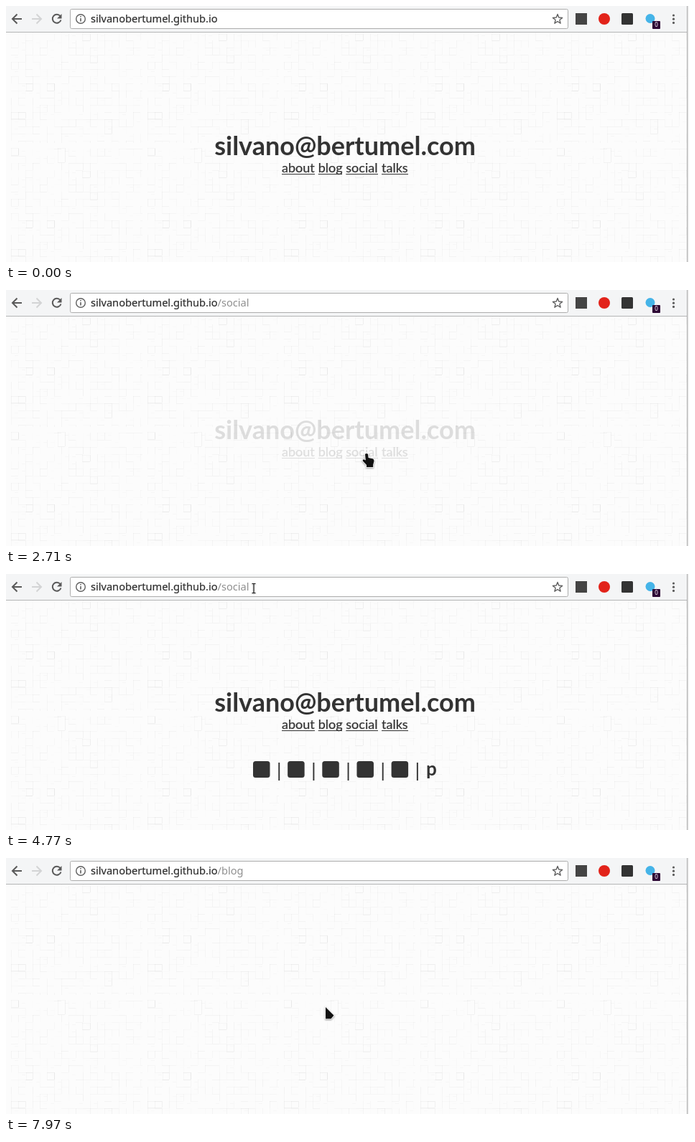
Recreate the animation shown at these times as an HTML page with a canvas. Size 951 by 357 pixels, loop 8000 ms.

```html
<!DOCTYPE html>
<html lang="en">
<head>
<meta charset="utf-8">
<title>Personal page</title>
<style>
  html, body { margin: 0; width: 951px; height: 357px; overflow: hidden; background: #fcfcfc; }
  canvas, svg { position: absolute; left: 0; top: 0; display: block; }
  .lato { font-family: Lato, sans-serif; fill: #333; }
  .title { font-size: 36px; font-weight: 700; text-anchor: middle; }
  .link { font-size: 18px; font-weight: 400; stroke: #333; stroke-width: .25px; }
  .url { font: 14.6px "Noto Sans", "Open Sans", sans-serif; fill: #2e2e2e; stroke: #2e2e2e; stroke-width: .2px; white-space: pre; }
  .url tspan { fill: #8f8f8f; stroke: none; }
</style>
</head>
<body>
<canvas id="paper" width="951" height="357"></canvas>
<svg width="951" height="357" viewBox="0 0 951 357">
  <g id="page">
    <g id="head">
      <text class="lato title" x="472" y="208">silvano@bertumel.com</text>
      <g id="links"></g>
    </g>
    <g id="social" fill="#333"></g>
  </g>

  <rect width="948" height="36" fill="#f4f5f6"/>
  <rect y="36" width="948" height="1" fill="#b4b5b6"/>
  <rect x="949" width="2" height="357" fill="#eeeeee"/>
  <rect x="948" width="1" height="357" fill="#aaaaaa"/>

  <g fill="none" stroke="#5a5a5a" stroke-width="2">
    <path d="M22 18H9.5M15.5 11.5L9 18l6.5 6.5"/>
    <path stroke="#d3d4d5" d="M36 18h12.5M42.5 11.5L49 18l-6.5 6.5"/>
    <path d="M75.5 14a6 6 0 1 0 1 5.5"/>
  </g>
  <path d="M77.5 11v6.5H71z" fill="#5a5a5a"/>

  <rect x="89.5" y="4.5" width="693" height="27" rx="2" fill="#fff" stroke="#adadad"/>
  <circle cx="104" cy="18" r="6.3" fill="none" stroke="#5f5f5f" stroke-width="1.4"/>
  <path d="M104 17v4.5M104 14v1.6" stroke="#5f5f5f" stroke-width="1.6"/>
  <text class="url" x="118" y="23">silvanobertumel.github.io<tspan id="path"></tspan></text>
  <path id="star" fill="none" stroke="#5f5f5f" stroke-width="1.4" stroke-linejoin="round"/>

  <rect x="793" y="10" width="16" height="16" fill="#444"/>
  <circle cx="833" cy="18" r="8" fill="#e2231a"/>
  <rect x="857" y="10" width="16" height="16" rx="1.5" fill="#333"/>
  <circle cx="897" cy="17.5" r="6.5" fill="#45b4e8"/>
  <rect x="900" y="21" width="11" height="11" rx="1" fill="#2d0735"/>
  <text x="905.5" y="29.3" text-anchor="middle" fill="#fff" style="font:8px 'Noto Sans',sans-serif">0</text>
  <g fill="#5a5a5a">
    <circle cx="929.5" cy="13" r="1.6"/><circle cx="929.5" cy="18.2" r="1.6"/><circle cx="929.5" cy="23.4" r="1.6"/>
  </g>

  <g id="cursor" style="filter:drop-shadow(.5px 1px 1px rgba(0,0,0,.4))">
    <path id="arrow" d="M0 0L11.5 11.5L7.5 16.3H0z" fill="#111" stroke="#fff" stroke-width="1.6" paint-order="stroke"/>
    <path id="hand" d="M-2 1Q0-1 2 1L2.6 6L8.5 7.2Q10.8 8 10.4 11L9.2 15.5V19H0V16L-5.2 10.6Q-6 7.6-3 8.4L-1.2 9.6z"
      fill="#111" stroke="#fff" stroke-width="1.6" paint-order="stroke"/>
    <path id="beam" d="M-2.5-6.5h1.8L0-6L.7-6.5H2.5M0-6V6M-2.5 6.5h1.8L0 6L.7 6.5H2.5" fill="none" stroke="#111" stroke-width="1.1"/>
  </g>
</svg>
<script>
const LOOP = 8000;
const $ = id => document.getElementById(id);
const NS = 'http://www.w3.org/2000/svg';

function add(parent, tag, attrs, text = '') {
  const el = document.createElementNS(NS, tag);
  for (const k in attrs) el.setAttribute(k, attrs[k]);
  el.textContent = text;
  parent.append(el);
}

// Paper texture: faint seeded strokes on a 10px grid, repeated as a tile.
function drawPaper() {
  const w = 190, h = 191;
  const tile = document.createElement('canvas');
  tile.width = w; tile.height = h;
  const c = tile.getContext('2d');
  let seed = 41;
  const rnd = () => (seed = seed * 16807 % 2147483647) / 2147483647;
  const ink = a => c.fillStyle = `rgba(60,60,60,${a})`;
  c.fillStyle = '#fcfcfc';
  c.fillRect(0, 0, w, h);
  for (let y = 8; y < h; y += 10) for (let x = 7; x < w; x += 10) {
    ink(rnd() * .045);
    if (rnd() < .6) c.fillRect(x, y, 10, 1);
    ink(rnd() * .045);
    if (rnd() < .6) c.fillRect(x, y, 1, 10);
    ink(rnd() * .03);
    if (rnd() < .3) c.fillRect(x + 5, y + 3, 5, 1);
  }
  const boxes = [[28,108,9,10],[57,108,10,10],[7,148,20,9],[106,39,11,9],[117,69,10,10],[7,7,10,10],[72,7,10,20],[137,158,10,20]];
  for (const [x, y, bw, bh] of boxes) {
    ink(.055);
    c.fillRect(x, y + bh, bw, 1);
    c.fillRect(x + bw, y, 1, bh);
    ink(.03);
    c.fillRect(x, y, 1, bh);
    c.fillRect(x, y, bw, 1);
  }
  const p = $('paper').getContext('2d');
  p.fillStyle = p.createPattern(tile, 'repeat');
  p.fillRect(0, 0, 951, 357);
}

const words = [['about', 384, 430], ['blog', 434.7, 468], ['social', 473.3, 518], ['talks', 523, 560]];

function build() {
  for (const [word, x, end] of words) {
    add($('links'), 'text', { class: 'lato link', x, y: 232 }, word);
    add($('links'), 'rect', { x, y: 234, width: end - x, height: 1, fill: '#333' });
  }
  for (let i = 0; i < 5; i++) {
    const x = 344 + 48.15 * i;
    add($('social'), 'rect', { x, y: 261, width: 23.5, height: 23, rx: 3.5 });
    add($('social'), 'rect', { x: x + 35.3, y: 263, width: 1.9, height: 25 });
  }
  add($('social'), 'text', { x: 585, y: 281, class: 'lato', style: 'font-size:26px;font-weight:700' }, 'p');
  let d = '';
  for (let i = 0; i < 10; i++) {
    const r = i % 2 ? 3 : 7, a = Math.PI * (i / 5 - .5);
    d += (i ? 'L' : 'M') + (768 + r * Math.cos(a)).toFixed(2) + ' ' + (18.5 + r * Math.sin(a)).toFixed(2);
  }
  $('star').setAttribute('d', d + 'z');
}

// Pointer stops: time, x, y; a trailing 1 eases the move towards that stop.
const stops = [
  [500, 587, 171], [820, 552, 195], [1270, 530, 223], [1320, 530, 223], [1500, 535, 223],
  [1930, 511, 227], [2090, 502, 228], [2760, 502, 228], [3100, 503, 230], [3570, 503, 230],
  [4340, 347, 19, 1], [4470, 345, 20], [4770, 345, 20], [5490, 509, 235, 1], [6200, 509, 235],
  [6480, 485, 230], [6840, 447, 204], [7100, 447, 204], [7165, 452, 205], [7230, 447, 206],
  [7930, 447, 206], [7970, 445, 208], [8000, 445, 208]
];

const ramp = (t, a, b) => Math.min(1, Math.max(0, (t - a) / (b - a)));

function pointerAt(t) {
  const i = Math.max(1, stops.findIndex(s => s[0] > t));
  const [t0, x0, y0] = stops[i - 1], [t1, x1, y1, eased] = stops[i];
  let k = ramp(t, t0, t1);
  if (eased) k = k * k * (3 - 2 * k);
  return [x0 + (x1 - x0) * k, y0 + (y1 - y0) * k];
}

function shapeAt(t, x, y, lift) {
  if (t >= 4430 && y < 32) return 'beam';
  if (t >= 7820) return 'arrow';
  const py = y + lift;
  const onTitle = x > 291 && x < 653 && py > 178 && py < 217;
  const onLink = py >= 217 && py < 238 && words.some(([, a, b]) => x >= a && x <= b);
  return onTitle || onLink ? 'hand' : 'arrow';
}

function draw(t) {
  const moved = t >= 2755;
  const lift = moved ? 16 : 0;
  const headAlpha = moved ? ramp(t, 2755, 3000) : 1 - ramp(t, 2490, 2750);
  $('head').setAttribute('transform', `translate(0 ${-lift})`);
  $('head').setAttribute('opacity', headAlpha);
  $('social').setAttribute('opacity', ramp(t, 2985, 3255));
  $('page').setAttribute('opacity', 1 - ramp(t, 7550, 7820));
  $('path').textContent = t < 2510 ? '' : t < 7580 ? '/social' : '/blog';

  const [x, y] = pointerAt(t);
  const shape = shapeAt(t, x, y, lift);
  $('cursor').setAttribute('visibility', t < 500 ? 'hidden' : 'visible');
  $('cursor').setAttribute('transform', `translate(${Math.round(x)} ${Math.round(y)})`);
  for (const id of ['arrow', 'hand', 'beam']) $(id).style.display = id === shape ? '' : 'none';
}

drawPaper();
build();
const start = performance.now();
function tick() {
  draw((performance.now() - start) % LOOP);
  requestAnimationFrame(tick);
}
tick();
</script>
</body>
</html>
```
